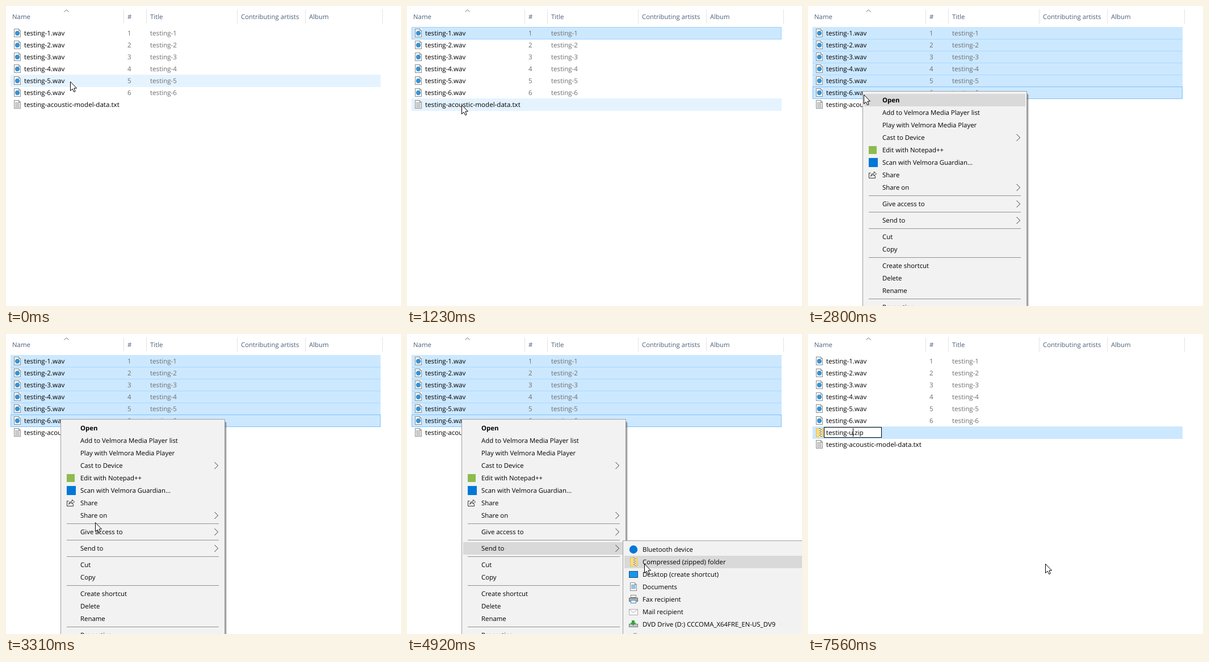
An HTML page with a canvas that plays this animation: 696 px wide and 529 px high, repeating every 8 s.

```html
<!DOCTYPE html>
<html lang="en">
<head>
<meta charset="utf-8">
<title>Zipping files</title>
<style>
html, body { margin: 0; width: 100%; height: 100%; overflow: hidden; background: #fff; }
canvas { display: block; }
</style>
</head>
<body>
<canvas id="stage" width="696" height="529"></canvas>
<script>
const ctx = document.getElementById('stage').getContext('2d');
const LOOP = 8000;
const FILE_SIZE = 11.6, UI_SIZE = 11.4;

// Pointer moves: start, end, number of steps, target x, target y
const START = [113, 133];
const MOVES = [
  [60, 640, 9, 95, 43],
  [800, 800, 1, 96, 47],
  [880, 1300, 7, 96, 181],
  [1380, 1590, 4, 96, 150],
  [2730, 3310, 9, 157, 332],
  [3380, 3510, 3, 153, 370],
  [3600, 3880, 5, 200, 376],
  [4100, 4690, 9, 418, 407],
  [4840, 4920, 2, 418, 405],
];
const SELECT_ONE = 640, SELECT_ALL = 1740, MENU_OPEN = 2360, SUBMENU_OPEN = 3810,
  MENU_CLOSE = 5070, ZIP_SHOWN = 5150, RENAME = 5300, CARET = 6210;
const TYPED = 'testing-u';
const KEY_TIMES = [6440, 6540, 6650, 6820, 6890, 6950, 7020, 7180, 7560];

const SEPARATOR = '-';
const MENU = ['Open', 'Add to Velmora Media Player list', 'Play with Velmora Media Player',
  'Cast to Device', 'Edit with Notepad++', 'Scan with Velmora Guardian...', 'Share', 'Share on',
  SEPARATOR, 'Give access to', SEPARATOR, 'Send to', SEPARATOR, 'Cut', 'Copy', SEPARATOR,
  'Create shortcut', 'Delete', 'Rename', SEPARATOR, 'Properties'];
const SUBMENU = ['Bluetooth device', 'Compressed (zipped) folder', 'Desktop (create shortcut)',
  'Documents', 'Fax recipient', 'Mail recipient', 'DVD Drive (D:) CCCOMA_X64FRE_EN-US_DV9', ''];
const WITH_ARROW = ['Cast to Device', 'Share on', 'Give access to', 'Send to'];

function rect(x, y, w, h, color) {
  ctx.fillStyle = color;
  ctx.fillRect(x, y, w, h);
}
function frame(x, y, w, h, color) {
  ctx.strokeStyle = color;
  ctx.lineWidth = 1;
  ctx.strokeRect(x + .5, y + .5, w - 1, h - 1);
}
function box(x, y, w, h, fill, edge) {
  rect(x, y, w, h, fill);
  frame(x, y, w, h, edge);
}
function circle(x, y, r, color) {
  ctx.fillStyle = color;
  ctx.beginPath();
  ctx.arc(x, y, r, 0, 7);
  ctx.fill();
}
function line(points, color, width = 1) {
  ctx.strokeStyle = color;
  ctx.lineWidth = width;
  ctx.beginPath();
  points.forEach(([x, y]) => ctx.lineTo(x, y));
  ctx.stroke();
}
function setFont(size, weight = 400) {
  ctx.font = `${weight} ${size}px "Open Sans", "Noto Sans", sans-serif`;
  ctx.textRendering = 'geometricPrecision';
}
function text(str, x, y, color, size = FILE_SIZE, weight = 400) {
  setFont(size, weight);
  ctx.fillStyle = color;
  ctx.fillText(str, x, y);
}
function textWidth(str) {
  setFont(FILE_SIZE);
  return Math.round(ctx.measureText(str).width);
}

function page(x, y) {
  box(x, y, 12, 15, '#fdfdfd', '#8c8c8c');
  rect(x + 9, y, 3, 3, '#fff');
  line([[x + 8.5, y], [x + 8.5, y + 3.5], [x + 12, y + 3.5]], '#8c8c8c');
  line([[x + 8.5, y + .5], [x + 11.5, y + 3.5]], '#8c8c8c');
}
function audioIcon(y) {
  page(14, y);
  circle(20, y + 8, 4.2, '#3a93d2');
}
function textIcon(y) {
  page(14, y);
  for (let i = 0; i < 5; i++) rect(16, y + 4 + i * 2, 8, 1, '#9a9a9a');
}
function zipIcon(x, y) {
  box(x, y, 13, 16, '#fbdc79', '#e9bd4b');
  rect(x + 6, y, 4, 16, '#e8e2cc');
  for (let i = 0; i < 8; i++) rect(x + 6 + i % 2 * 2, y + i * 2, 2, 1, '#5c5c5c');
}

function pointerAt(t) {
  let [x, y] = START;
  for (const [from, to, steps, endX, endY] of MOVES) {
    if (t < from) break;
    const gap = steps > 1 ? (to - from) / (steps - 1) : 1;
    const u = Math.min(1, (Math.floor((t - from) / gap + 1e-6) + 1) / steps);
    const eased = u * u * (3 - 2 * u);
    x += (endX - x) * eased;
    y += (endY - y) * eased;
  }
  return [Math.round(x), Math.round(y)];
}

const rowTop = i => 37 + 21 * i;
function fillRow(i, color, edge) {
  rect(8, rowTop(i), 652, 22, color);
  if (edge) frame(8, rowTop(i), 652, 22, edge);
}

function drawHeader() {
  [['Name', 11], ['#', 214], ['Title', 254], ['Contributing artists', 414], ['Album', 534]]
    .forEach(([label, x]) => text(label, x, 23, '#4c607a', UI_SIZE));
  [207, 247, 407, 527, 663].forEach(x => rect(x, 6, 1, 25, '#e3e3e3'));
  line([[102.5, 10.5], [106.5, 6.5], [110.5, 10.5]], '#6d6d6d');
}

function drawFiles(t, pointerY) {
  const zipped = t >= ZIP_SHOWN;
  if (zipped) {
    fillRow(6, '#cce8ff');
  } else if (t >= SELECT_ALL) {
    for (let i = 0; i < 6; i++) {
      fillRow(i, '#cce8ff');
      if (i) rect(8, rowTop(i), 652, 1, '#a8d8ff');
    }
    frame(8, rowTop(5), 652, 22, '#7cc1fa');
  } else {
    const hovered = Math.floor((pointerY - 37) / 21);
    if (hovered >= 0 && hovered < 7) fillRow(hovered, '#e5f3ff');
    if (t >= SELECT_ONE) fillRow(0, '#cce8ff', '#99d1ff');
  }
  for (let i = 0; i < 6; i++) {
    const y = rowTop(i), base = y + 15;
    audioIcon(y + 3);
    text(`testing-${i + 1}.wav`, 32, base, '#000');
    text(`${i + 1}`, 214, base, '#6d6d6d');
    text(`testing-${i + 1}`, 254, base, '#6d6d6d');
  }
  const last = rowTop(zipped ? 7 : 6);
  textIcon(last + 3);
  text('testing-acoustic-model-data.txt', 32, last + 15, '#000');
  if (zipped) drawZipName(t);
}

function drawZipName(t) {
  zipIcon(14, 166);
  const count = KEY_TIMES.filter(k => t >= k).length;
  const name = count ? TYPED.slice(0, count) : 'testing-6';
  const end = 32 + textWidth(name);
  const editing = t >= RENAME, selected = editing && !count;
  if (editing) box(28, 164, end + 23, 19, '#fff', '#000');
  if (selected) rect(32, 166, end - 32, 16, '#0078d7');
  text(name, 32, 178, selected ? '#fff' : '#000');
  text('.zip', end, 178, '#000');
  if (t >= CARET) rect(end, 166, 1, 15, '#000');
}

function layout(items, top) {
  return items.map(label => {
    const height = label === SEPARATOR ? 7 : 22;
    const item = { label, top, height };
    top += height;
    return item;
  });
}
const menuItems = layout(MENU, 155), submenuItems = layout(SUBMENU, 369);
const itemAt = (items, y) =>
  items.find(i => i.label !== SEPARATOR && y >= i.top && y < i.top + i.height);

function drawPanel(x, y, w) {
  for (let i = 3; i > 0; i--) rect(x + 4, y + 3 + i, w - 4 + i, 400, 'rgba(0,0,0,.16)');
  box(x, y, w, 400, '#f2f2f2', '#a0a0a0');
}

function drawMenu(active) {
  drawPanel(96, 150, 290);
  for (const { label, top } of menuItems) {
    const mid = top + 11;
    if (label === SEPARATOR) {
      rect(107, top + 3, 268, 1, '#919191');
      continue;
    }
    if (active && active.label === label) rect(99, top, 284, 22, '#d9d9d9');
    text(label, 131, mid + 4, '#000', UI_SIZE, label === 'Open' ? 700 : 400);
    if (WITH_ARROW.includes(label))
      line([[367.5, mid - 6], [373.5, mid], [367.5, mid + 6]], '#333');
  }
  rect(107, 247, 14, 14, '#8dbb4f');
  rect(107, 268, 16, 16, '#0078d7');
  line([[110.5, 294.5], [107.5, 294.5], [107.5, 303.5], [118.5, 303.5], [118.5, 300]], '#333');
  line([[110.5, 300.5], [112, 296.5], [116.5, 295], [116.5, 292], [120.5, 296], [116.5, 300],
    [116.5, 297.5], [113, 298], [110.5, 300.5]], '#333');
}

function drawSubmenuIcons() {
  circle(399, 380, 7.2, '#0078d7');
  zipIcon(393, 394);
  box(391, 418, 16, 12, '#1596ee', '#24506f');
  page(393, 438);
  for (let i = 0; i < 4; i++) rect(395, 442 + i * 2, 8, 1, '#2f87c8');
  box(394, 460, 10, 5, '#fff', '#888');
  box(391, 465, 16, 7, '#a9b0b6', '#666');
  box(394, 469, 10, 6, '#eaf4fb', '#5089b0');
  box(391, 485, 16, 11, '#fafafa', '#b0b0b0');
  line([[391.5, 485.5], [399, 491.5], [406.5, 485.5]], '#b0b0b0');
  box(391, 511, 16, 6, '#c3c7ca', '#777');
  ctx.fillStyle = '#2fa83a';
  ctx.beginPath();
  [[396, 505], [401, 505], [401, 509], [404, 509], [398.5, 514], [393, 509], [396, 509]]
    .forEach(([x, y]) => ctx.lineTo(x, y));
  ctx.fill();
  circle(402, 532, 5, '#b5b9bc');
}

function drawSubmenu(active) {
  drawPanel(380, 364, 330);
  if (active) rect(383, active.top, 320, 22, '#d9d9d9');
  submenuItems.forEach(({ label, top }) => text(label, 415, top + 15, '#000', UI_SIZE));
  drawSubmenuIcons();
}

function drawMenus(t, x, y) {
  if (t < MENU_OPEN || t >= MENU_CLOSE) return;
  const subOpen = t >= SUBMENU_OPEN;
  const inSubmenu = subOpen && x >= 380;
  const sendTo = menuItems.find(i => i.label === 'Send to');
  const active = inSubmenu ? sendTo : itemAt(menuItems, y) || (subOpen && sendTo);
  ctx.globalAlpha = t < MENU_OPEN + 70 ? .6 : 1;
  drawMenu(active);
  if (subOpen) {
    ctx.globalAlpha = t < SUBMENU_OPEN + 70 ? .6 : 1;
    drawSubmenu(inSubmenu && itemAt(submenuItems, y));
  }
  ctx.globalAlpha = 1;
}

function drawPointer(x, y) {
  ctx.beginPath();
  [[0, 0], [0, 16], [3.6, 12.6], [6.2, 18], [8.6, 17], [6.4, 11.5], [11, 11.5]]
    .forEach(([dx, dy]) => ctx.lineTo(x + dx + .5, y + dy + .5));
  ctx.closePath();
  ctx.fillStyle = '#fff';
  ctx.fill();
  ctx.strokeStyle = '#000';
  ctx.lineWidth = 1;
  ctx.stroke();
}

function render() {
  const t = performance.now() % LOOP;
  const [x, y] = pointerAt(t);
  rect(0, 0, 696, 529, '#fff');
  drawHeader();
  drawFiles(t, y);
  drawMenus(t, x, y);
  drawPointer(x, y);
  requestAnimationFrame(render);
}
render();
</script>
</body>
</html>
```
